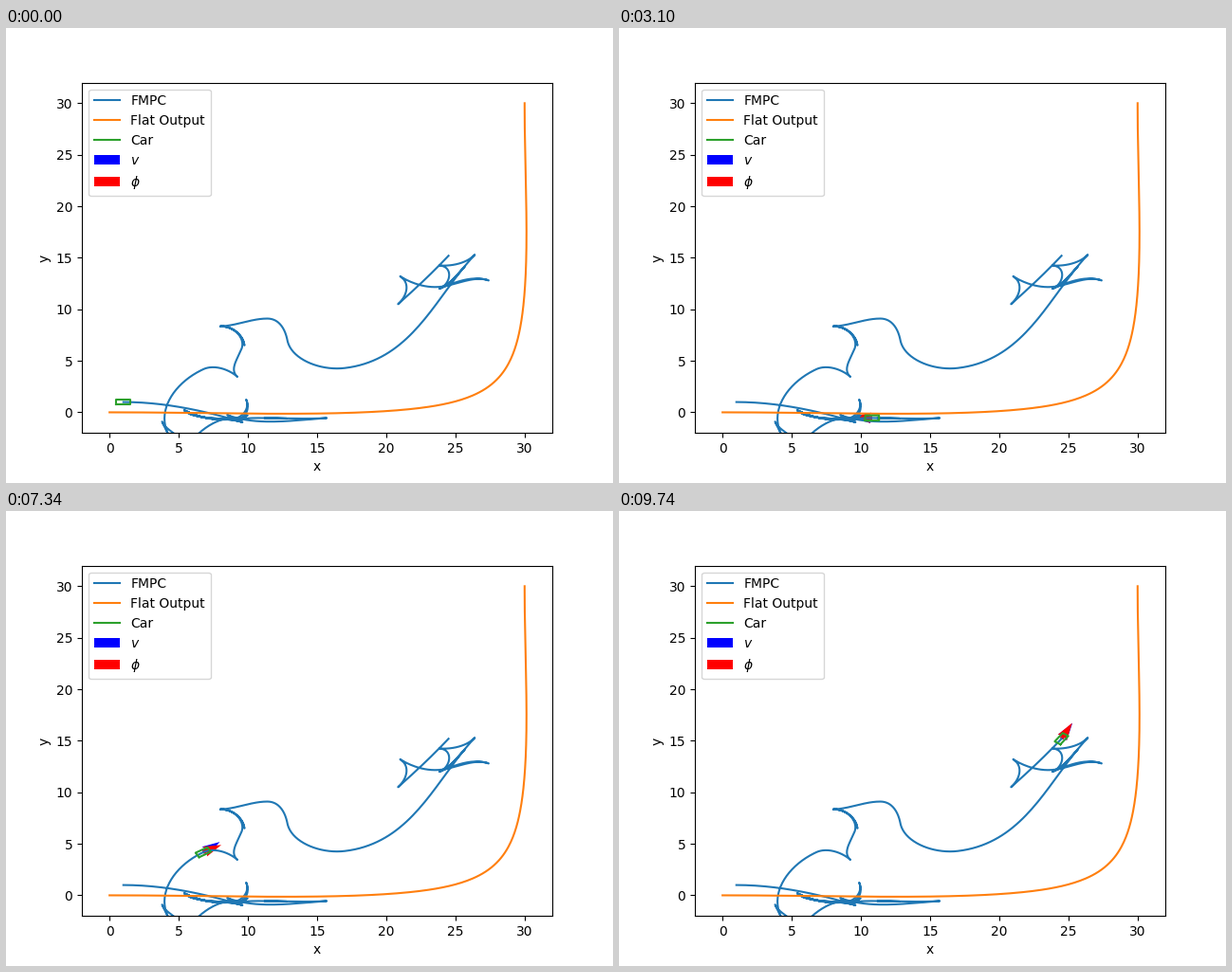
A matplotlib script for the animation above (9840 ms loop, 640x480 px).

```python
import numpy as np
import matplotlib.pyplot as plt
from matplotlib.animation import FuncAnimation

LOOP, INTERVAL = 9840, 40
MAX_STEER = np.radians(40)


def rock(t, period, count, *ends):
    """Shuttle between end poses at a steady period."""
    return [(t + i * period, *ends[i % len(ends)]) for i in range(count)]


# Poses the car drives between: step, x, y, heading in degrees.
POSES = [
    (0, 1, 1, 0),
    *rock(4.5, 3, 3, (9.6, -0.95, -22), (5.7, -0.1, -30)),
    (16.5, 8.5, -0.25, -27),
    (21, 15.7, -0.55, 5),
    *rock(26, 2.2, 2, (11.2, -0.55, 0), (12.8, -0.6, 0)),
    *rock(33.3, 2.55, 7, (9.2, -0.7, 13), (9.95, -0.3, 30)),
    (51.2, 9.87, 1.24, 110),
    (53.3, 8.9, -0.65, 10),
    *rock(57, 2.5, 4, (5.4, 0.2, -35), (8.6, -0.55, 14)),
    (67.5, 5.4, -3.6, 60),
    (69.5, 3.8, -0.9, 105),
    (70.4, 4.2, -2, 109),
    (74, 6.77, 4.18, 32),
    (75.7, 9.24, 3.45, -50),
    (76.4, 9.55, 6.2, -105),
    *rock(77.1, 1.1, 3, (8, 8.35, 2), (9.75, 6.5, -85)),
    (80.2, 11.4, 9.1, 0),
    (81, 12.85, 7, -82),
    (83, 17, 4.3, 9),
    (87, 26.4, 15.3, 55),
    (88, 23.85, 14.25, -5),
    *rock(88.7, 0.4, 3, (23.85, 12, -150), (25.7, 14.2, -125)),
    (90, 27.4, 12.8, 155),
    (91.7, 24, 12.2, -170),
    (93, 21, 13.2, 140),
    (95, 20.85, 10.5, 50),
    (98, 24.5, 15.2, 55),
]


class Leg:
    """Cubic between two poses, driven forward or in reverse."""

    def __init__(self, start, end):
        self.t0, self.t1 = start[0], end[0]
        p, q = np.array(start[1:3]), np.array(end[1:3])
        a, b = np.radians([start[3], end[3]])
        u, v = (np.array([np.cos(h), np.sin(h)]) for h in (a, b))
        self.gear = 1 if (q - p) @ (u + v) > 0 else -1
        # A circular arc turning by the same angle sets the tangent length.
        turn = (b - a + np.pi) % (2 * np.pi) - np.pi
        size = self.gear * np.hypot(*(q - p)) / np.sinc(turn / (2 * np.pi))
        u, v = size * u, size * v
        self.coef = np.array([2 * (p - q) + u + v, 3 * (q - p) - 2 * u - v, u, p])

    def path(self, s):
        return np.vander(s, 4) @ self.coef

    def pose(self, t):
        s = (t - self.t0) / (self.t1 - self.t0)
        pos = np.array([s**3, s**2, s, 1]) @ self.coef
        dx, dy = vel = np.array([3 * s**2, 2 * s, 1, 0]) @ self.coef
        ax_, ay_ = np.array([6 * s, 2, 0, 0]) @ self.coef
        heading = np.arctan2(self.gear * dy, self.gear * dx)
        curve = self.gear * (dx * ay_ - dy * ax_) / np.hypot(*vel) ** 3
        steer = np.clip(np.arctan(curve), -MAX_STEER, MAX_STEER)
        return pos, heading, steer, self.gear


legs = [Leg(a, b) for a, b in zip(POSES, POSES[1:])]


def step_at(ms):
    """One step per 100 ms, with a single short 40 ms step after 7000 ms."""
    return int(ms // 100) if ms < 7040 else 71 + int((ms - 7040) // 100)


def corner(size=30, width=3.7, dip=0.18):
    """Two straight runs joined by a soft corner, each sagging slightly."""
    s = np.linspace(-size, size, 300)
    p, q = (width * np.log1p(np.exp(r / width)) for r in (s, -s))
    sag = lambda r: dip * np.sin(np.pi * np.clip(r / size, 0, 1)) ** 2
    return size - q + sag(p), p - sag(q)


fig, ax = plt.subplots(figsize=(6.4, 4.8), dpi=100)
ax.plot(*np.vstack([leg.path(np.linspace(0, 1, 40)) for leg in legs]).T, label="FMPC")
ax.plot(*corner(), label="Flat Output")
car, = ax.plot([], [], label="Car")
arrow = dict(angles="uv", scale_units="dots", scale=1)
v_arrow = ax.quiver([0], [0], [0], [0], color="blue", label="$v$", **arrow)
phi_arrow = ax.quiver([0], [0], [0], [0], color="red", label=r"$\phi$", **arrow)
ax.set(xlim=(-2, 32), ylim=(-2, 32), xlabel="x", ylabel="y")
ax.legend(loc="upper left")

CORNERS = np.array([(-.5, -.25), (.5, -.25), (.5, .25), (-.5, .25), (-.5, -.25)])


def update(k):
    step = step_at((k + 0.5) * INTERVAL)
    leg = next(g for g in legs if step <= g.t1)
    pos, h, steer, gear = leg.pose(step)
    c, s = np.cos(h), np.sin(h)
    car.set_data(*(CORNERS @ np.array([[c, s], [-s, c]]) + pos).T)
    # Arrows grow with the steering effort; the car starts at rest.
    size = gear * (20 + 10 * (steer / MAX_STEER) ** 2)
    for q, angle in ((v_arrow, h), (phi_arrow, h + steer)):
        q.set_visible(step > 0)
        q.set_offsets([pos])
        q.set_UVC([size * np.cos(angle)], [size * np.sin(angle)])
    return car, v_arrow, phi_arrow


anim = FuncAnimation(fig, update, frames=LOOP // INTERVAL, interval=INTERVAL,
                     repeat=True, repeat_delay=0)
plt.show()
```
